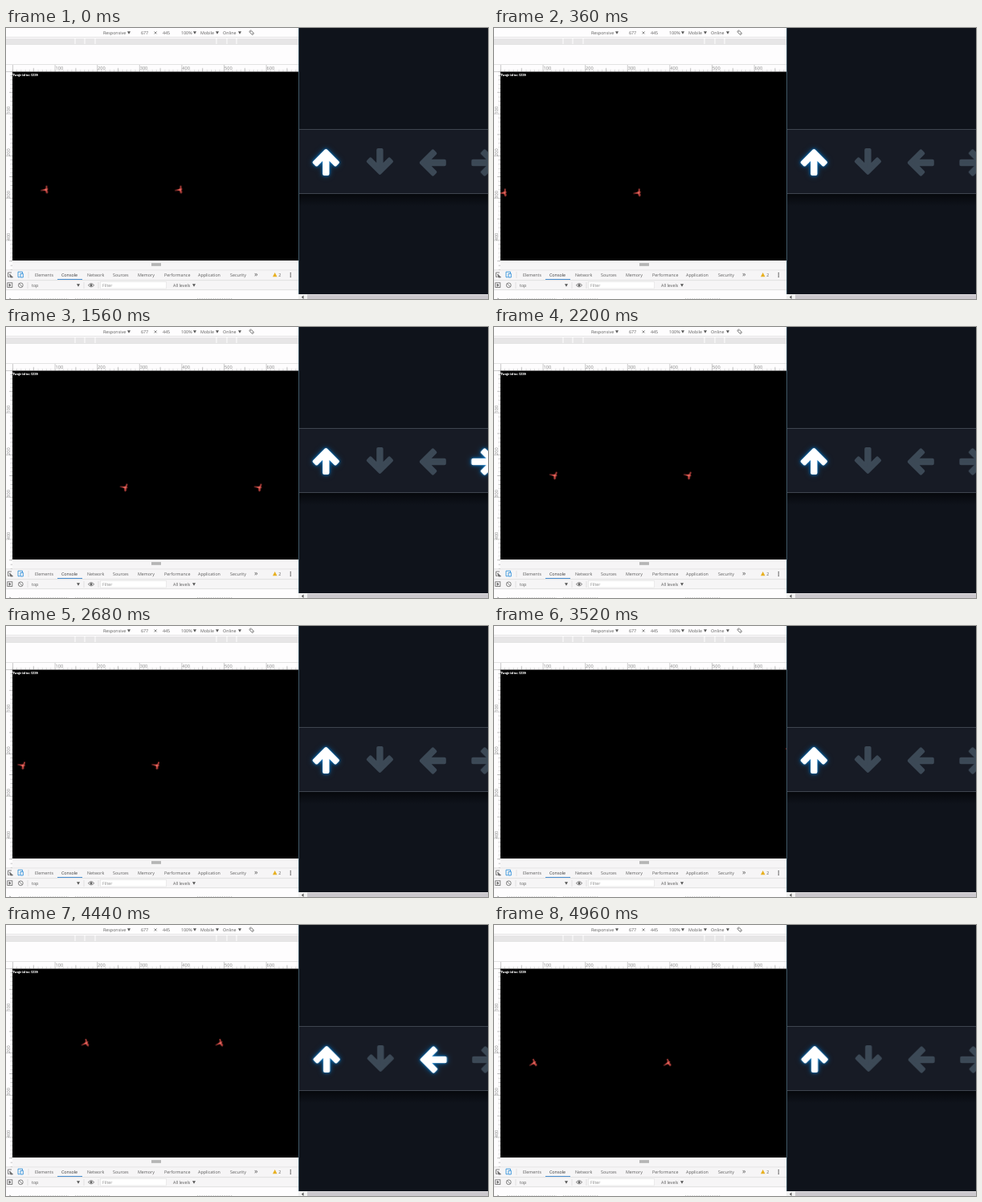
Recreate the animation shown at these times as an HTML page. Size 600 px wide and 338 px high, loop 5000 ms.

```html
<!DOCTYPE html>
<html lang="en">
<head>
<meta charset="utf-8">
<title>Ship steering</title>
<style>
html, body { margin: 0; width: 100%; height: 100%; overflow: hidden; background: #fff; }
svg { display: block; width: 100vw; height: 100vh; }
text { font-family: "Open Sans", "Noto Sans", sans-serif; font-size: 5.35px; fill: #5a5a5a; text-rendering: geometricPrecision; }
.tri { fill: #555; }
.line { stroke: #d8d8d8; stroke-width: .7; }
.icon { fill: none; stroke: #666; stroke-width: .8; }
.ruler text { fill: #8a8a8a; font-size: 5.6px; }
.title { font: bold 4.3px "Liberation Serif", serif; fill: #fff; stroke: #fff; stroke-width: .15; }

.fleet { animation: fly 5s linear infinite, show 5s step-end infinite; }
.heading { animation: turn 5s linear infinite; }
.late { animation: late 5s step-end infinite; }
.arrows { animation: nudge 5s step-end infinite; }
.key { fill: #3c4956; stroke: #3c4956; stroke-width: 4; stroke-linejoin: round; }
.lit { fill: #fff; stroke: #fff; filter: drop-shadow(0 0 1.6px #0b83d4) drop-shadow(0 0 3px #084f86); }
.right { animation: right 5s step-end infinite; }
.left { animation: left 5s step-end infinite; }

/* the ship leaves on the left and comes back in from the right */
@keyframes fly {
  0% { transform: translate(48px, 201px); }
  9.6% { transform: translate(-1px, 206px); }
  9.61%, 21.6% { transform: translate(201.5px, 206.5px); }
  26% { transform: translate(176.6px, 205px); }
  29.6% { transform: translate(156.1px, 201px); }
  31.2% { transform: translate(147px, 199px); }
  57.6% { transform: translate(-3.2px, 168.1px); }
  57.61%, 70.4% { transform: translate(201px, 153px); }
  80.8% { transform: translate(142px, 141px); }
  84% { transform: translate(124px, 139.5px); }
  86.4% { transform: translate(111px, 142px); }
  88.8% { transform: translate(98px, 147px); }
  99.2% { transform: translate(48px, 172px); }
  100% { transform: translate(44.2px, 173.9px); }
}
@keyframes turn {
  0%, 22% { transform: rotate(-8deg); }
  32%, 82% { transform: rotate(12deg); }
  88.8% { transform: rotate(-24deg); }
  93%, 100% { transform: rotate(-30deg); }
}
@keyframes show {
  0% { visibility: visible; }
  9.2% { visibility: hidden; }
  21.6% { visibility: visible; }
  57.4% { visibility: hidden; }
  70.3% { visibility: visible; }
}
@keyframes late {
  0% { opacity: 1; }
  21% { opacity: 0; }
  22.4% { opacity: 1; }
  70% { opacity: 0; }
  71% { opacity: 1; }
}
@keyframes nudge {
  0% { transform: none; }
  81.6% { transform: translate(.8px, 0); }
}
@keyframes right {
  0% { opacity: 0; }
  23.2% { opacity: 1; }
  33.6% { opacity: 0; }
}
@keyframes left {
  0% { opacity: 0; }
  82.4% { opacity: 1; }
  93.6% { opacity: 0; }
}
</style>
</head>
<body>
<svg viewBox="0 0 600 338" preserveAspectRatio="none">
  <defs>
    <pattern id="ticksX" x="8" y="46" width="52.6" height="8.5" patternUnits="userSpaceOnUse">
      <path d="M.3 0V8.5M26.3 4V8.5" stroke="#999" stroke-width=".6"/>
      <path d="M0 7.3H52.6" stroke="#aaa" stroke-width="2.4" stroke-dasharray=".6 4.66"/>
    </pattern>
    <pattern id="ticksY" x="0" y="54" width="8" height="52.6" patternUnits="userSpaceOnUse">
      <path d="M0 .3H8M4 26.3H8" stroke="#999" stroke-width=".6"/>
      <path d="M6.8 0V52.6" stroke="#aaa" stroke-width="2.4" stroke-dasharray=".6 4.66"/>
    </pattern>
    <clipPath id="screen"><rect x="8" y="54.5" width="356" height="235.5"/></clipPath>
    <linearGradient id="shade" x2="0" y2="1">
      <stop offset="0" stop-color="#06080c"/>
      <stop offset="1" stop-color="#0f131b"/>
    </linearGradient>
    <path id="tri" class="tri" d="M-2-1.8H2L0 1.8Z"/>
    <path id="arrow" d="M-14.6 0L0-14.6 14.6 0 11.7 2.9 2.2-6.6V14.4H-2.2V-6.6L-11.7 2.9Z"/>
    <g id="ship" transform="translate(.5 .9)">
      <path d="M-6 .2L-1.4-1 1-1.4 2-4.8 3.4-4.6 3-1.4 4.2-.4 2.6 1.2 3.4 3 2.4 4.8 1 4.4 .4 1.4-1.4.9Z" fill="#d24a45"/>
      <path d="M-5.5.2H-1.5M2.2-3.4L1.8-1.6M1.4 2.2L2 3.4" stroke="#7c332f" stroke-width=".7"/>
      <circle cx="1.2" r=".8" fill="#ee9182"/>
    </g>
  </defs>

  <rect width="364" height="338" fill="#fefdfe"/>

  <!-- device toolbar -->
  <text x="121" y="8">Responsive</text><use href="#tri" x="153" y="6"/>
  <text x="168" y="8">677</text><path class="icon" d="M184.6 4.4L187.6 7.4M187.6 4.4L184.6 7.4"/><text x="195" y="8">445</text>
  <text x="218" y="8">100%</text><use href="#tri" x="235" y="6"/>
  <text x="242" y="8">Mobile</text><use href="#tri" x="263" y="6"/>
  <text x="270" y="8">Online</text><use href="#tri" x="291" y="6"/>
  <g class="icon">
    <rect x="304.2" y="4.2" width="3" height="3" transform="rotate(45 305.7 5.7)"/>
    <path d="M302.8 5.2A3 3 0 0 1 305.2 2.7M308.6 6.2A3 3 0 0 1 306.2 8.7"/>
  </g>
  <path class="line" d="M0 11.5H364M0 20.5H364M0 45.5H364"/>
  <rect y="13" width="364" height="7" fill="#e7e6e7"/>
  <path d="M86 13V20M98 13V20M111 13V20M262 13V20M275 13V20M287 13V20" stroke="#fafafa" stroke-width="1.2"/>

  <!-- rulers -->
  <g class="ruler">
    <rect x="8" y="46" width="356" height="8.5" fill="url(#ticksX)"/>
    <rect y="54" width="8" height="248" fill="url(#ticksY)"/>
    <text x="61.5" y="52">100</text><text x="114" y="52">200</text><text x="166.7" y="52">300</text>
    <text x="219.3" y="52">400</text><text x="272" y="52">500</text><text x="324.5" y="52">600</text>
    <text transform="translate(5.2 107.5) rotate(-90)">100</text>
    <text transform="translate(5.2 160) rotate(-90)">200</text>
    <text transform="translate(5.2 212.7) rotate(-90)">300</text>
    <text transform="translate(5.2 265.3) rotate(-90)">400</text>
  </g>

  <!-- game -->
  <rect x="8" y="54.5" width="356" height="235.5"/>
  <text class="title" x="8" y="60.4">Twoje id to: 1229</text>
  <g clip-path="url(#screen)">
    <g class="fleet">
      <g class="late"><g class="heading"><use href="#ship"/></g></g>
      <g transform="translate(167 0)"><g class="heading"><use href="#ship"/></g></g>
    </g>
  </g>

  <!-- console -->
  <rect x="8" y="290" width="356" height="11" fill="#f6f5f6"/>
  <rect x="181" y="293" width="12" height="4" fill="#c4c4c4"/>
  <path d="M181 294.4H193M181 296H193" stroke="#999" stroke-width=".5"/>
  <rect y="302" width="364" height="24.5" fill="#f6f5f6"/>
  <path class="line" d="M0 301.8H364M0 314.6H364M0 326.6H364M28 304V312M27 317V325M97 317V325M115 317V325"/>
  <g class="icon">
    <path d="M7 305H2.5V310.5H4.5"/><path d="M4.5 307L8.5 311 5.5 311Z" fill="#666"/>
    <rect x="1.8" y="317.8" width="6" height="5.8"/><path d="M4 319.2V322.3L6 320.7Z" fill="#666"/>
    <circle cx="18.3" cy="320.8" r="2.9"/><path d="M16.3 318.8L20.3 322.8"/>
    <path d="M102.3 320.8Q106 316.6 109.7 320.8Q106 325 102.3 320.8Z"/>
    <circle cx="106" cy="320.8" r="1.1" fill="#444"/>
    <path d="M15 310.8V304.2H20.5V306M15 310.8H17.5M18 306.4H21.3V311H18Z" stroke="#1a86d8"/>
  </g>
  <text x="36" y="310">Elements</text><text x="69" y="310" style="fill:#333">Console</text>
  <text x="101" y="310">Network</text><text x="133" y="310">Sources</text>
  <text x="164" y="310">Memory</text><text x="197" y="310">Performance</text>
  <text x="239" y="310">Application</text><text x="279" y="310">Security</text>
  <text x="309" y="310.2" style="font-size:9px">»</text>
  <path d="M334.7 305L337.5 310.3H332Z" fill="#e8b020"/><text x="339.3" y="310">2</text>
  <path d="M354.3 305V311" stroke="#666" stroke-width="1.4" stroke-dasharray="1.4 .9"/>
  <rect x="64" y="313" width="31" height="1" fill="#4a8fd0"/>
  <text x="32" y="323">top</text><use href="#tri" x="90" y="321"/>
  <rect x="117.5" y="316.4" width="82" height="8.6" fill="#fff" stroke="#e2e2e2" stroke-width=".6"/>
  <text x="120" y="323" style="fill:#8a8a8a">Filter</text>
  <text x="208" y="323">All levels</text><use href="#tri" x="234" y="321"/>
  <path d="M4.5 336.6L6.3 338H4.5Z" fill="#888"/>
  <path d="M16 337.6H78M86 337.6H130M238 337.6H282" stroke="#bbb" stroke-width=".8" stroke-dasharray="1.2 1.6"/>

  <!-- key display -->
  <rect x="364" width="236" height="338" fill="#0f131b"/>
  <rect x="365" y="207" width="235" height="15" fill="url(#shade)"/>
  <rect x="364.5" y="126.5" width="240" height="80" fill="#171b25" stroke="#444b54" stroke-width=".9"/>
  <path d="M364.5 0V332" stroke="#3f5765"/>
  <g class="arrows">
    <use href="#arrow" class="key lit" transform="translate(398.3 167.6)"/>
    <use href="#arrow" class="key" transform="translate(465.4 166.3) rotate(180)"/>
    <g transform="translate(531.4 168) rotate(-90)">
      <use href="#arrow" class="key"/><g class="left"><use href="#arrow" class="key lit"/></g>
    </g>
    <g transform="translate(595.8 168) rotate(90)">
      <use href="#arrow" class="key"/><g class="right"><use href="#arrow" class="key lit"/></g>
    </g>
  </g>
  <rect x="364" y="332" width="236" height="6" fill="#f1f1f1"/>
  <rect x="375" y="332.5" width="225" height="5.5" fill="#cbc8cd"/>
  <path d="M370.5 333.5V338L367.8 335.7Z" fill="#555"/>
</svg>
</body>
</html>
```
